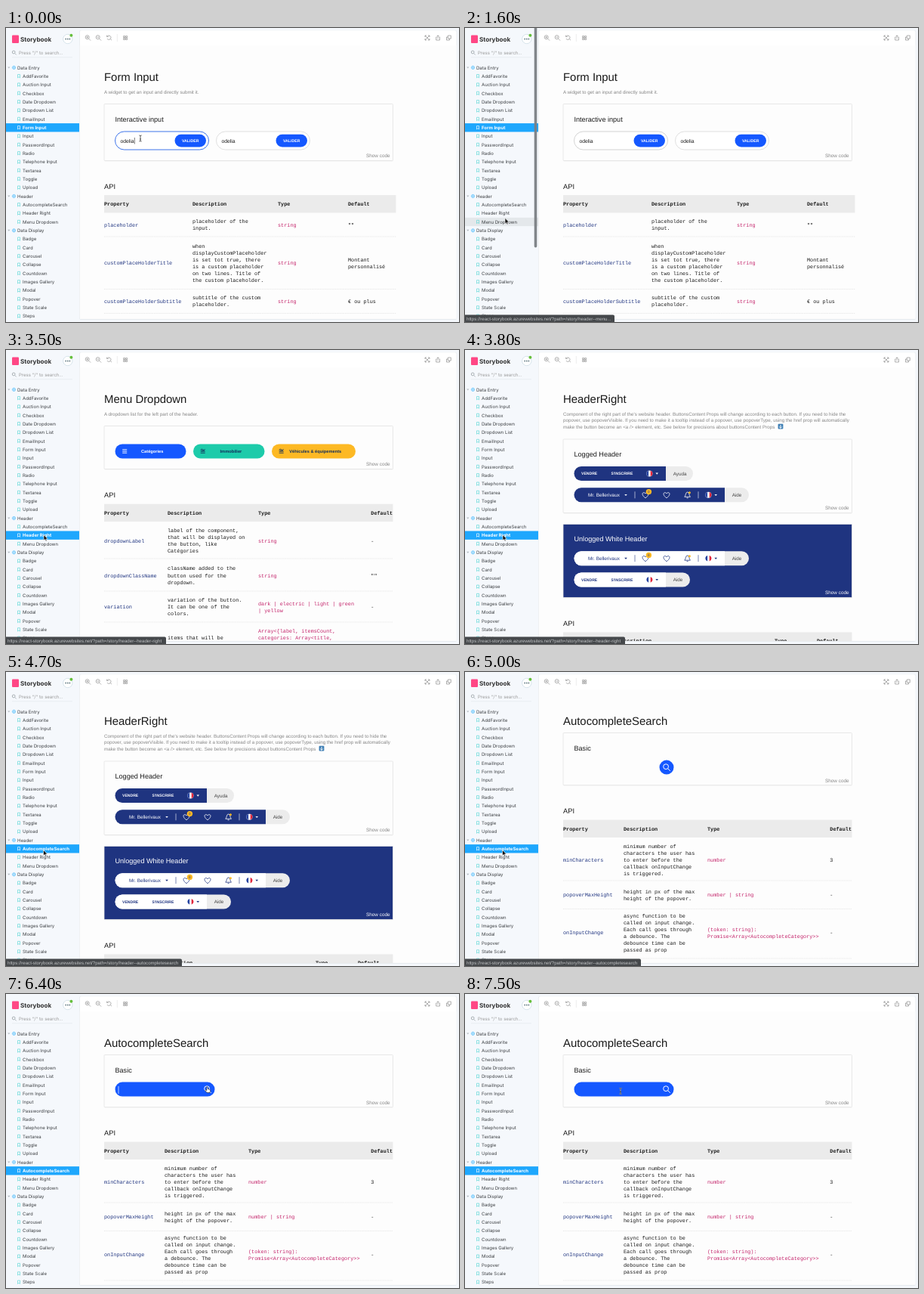
These frames come from a looping animation (600x389 px, 8 s). An HTML page:

```html
<!DOCTYPE html>
<html lang="en">
<head>
<meta charset="utf-8">
<title>Component library tour</title>
<style>
html, body { margin: 0; height: 100%; overflow: hidden; background: #f5f8fc; }
svg { display: block; width: 600px; height: 389px; font-family: "Liberation Sans", Arial, sans-serif; }
text { white-space: pre; text-rendering: geometricPrecision; }
.mono { font-family: "Liberation Mono", "Courier New", monospace; }
.side { font-family: Inter, Roboto, sans-serif; }
.row rect { fill: none; }
.row text { fill: #3c3f42; }
.row .mark { fill: none; stroke: #55d6d4; stroke-width: .65; }
.row.hover rect { fill: #e4e8eb; }
.row.on rect { fill: #1ea7fd; }
.row.on text { fill: #fff; font-weight: 700; }
.row.on .mark { stroke: #fff; }
</style>
</head>
<body>
<svg id="stage" viewBox="0 0 600 389"></svg>
<script>
const LOOP = 8000, ROW = 11.34, TOP = 52.4;
const BLUE = '#1558ff', NAVY = '#1f3480', INK = '#1a1a1a', GREY = '#868686', YELLOW = '#fdb924', PAPER = '#fdfdfd';

// ---- drawing helpers; text is placed by its vertical centre ----
const esc = s => s.replace(/&/g, '&amp;').replace(/</g, '&lt;');
const text = (x, y, s, size, fill = INK, more = '') =>
  `<text x="${x}" y="${(y + size * .35).toFixed(2)}" font-size="${size}" fill="${fill}" ${more}>${esc(s)}</text>`;
const bold = (x, y, s, size, fill) => text(x, y, s, size, fill, 'font-weight="700"');
const rect = (x, y, r, b, fill, rx = 0, more = '') =>
  `<rect x="${x}" y="${y}" width="${r - x}" height="${b - y}" rx="${rx}" fill="${fill}" ${more}/>`;
const line = (d, stroke, w = .8, more = '') =>
  `<path d="${d}" fill="none" stroke="${stroke}" stroke-width="${w}" ${more}/>`;
const dot = (x, y, r, fill, more = '') => `<circle cx="${x}" cy="${y}" r="${r}" fill="${fill}" ${more}/>`;
const at = (x, y, body) => `<g transform="translate(${x} ${y})">${body}</g>`;
const lens = (x, y, r, stroke, w = .8) =>
  at(x, y, dot(-.6, -.6, r, 'none', `stroke="${stroke}" stroke-width="${w}"`) +
    line(`M${r * .6} ${r * .6}L${r * 1.5} ${r * 1.5}`, stroke, w));

const card = (top, bottom, fill = PAPER, label = GREY) =>
  rect(130.6, top + .8, 512.6, bottom + .9, '#f0f0f0', 1) +
  rect(130, top, 512.5, bottom, fill, 1, 'stroke="#e4e4e4" stroke-width=".8"') +
  text(477, bottom - 6.4, 'Show code', 6.4, label);

const title = s => text(130, 64.5, s, 14.9);
const intro = lines => lines.map((s, i) => text(130, 85 + i * 8.2, s, 6.26, GREY)).join('');

// cols: x positions; rows: [centre, bottom, four cells]
function table(cols, y, right, rows) {
  const fills = [NAVY, INK, '#c4246b', INK];
  let out = rect(130, y - 11.6, right, y + 11.8, '#ebebeb');
  ['Property', 'Description', 'Type', 'Default'].forEach((s, i) => out += bold(cols[i], y, s, 6.83));
  for (const [mid, bottom, ...cells] of rows) {
    cells.forEach((cell, c) => {
      const parts = cell.split('\n');
      parts.forEach((s, i) => out += text(cols[c], mid + (i - (parts.length - 1) / 2) * 9.1, s, 6.83, fills[c]));
    });
    out += line(`M130 ${bottom}H${right}`, '#ddd', .7, 'stroke-dasharray="1.2 1"');
  }
  return text(130, y - 23.2, 'API', 9.3) + `<g class="mono">${out}</g>`;
}

// ---- pages ----
const field = (x, id) =>
  rect(x, 137, x + 124, 161, '#fff', 12, `id="${id}" stroke="#dcdcdc" stroke-width=".9"`) +
  text(x + 7, 149.3, 'odelia', 6.8) +
  rect(x + 79, 140.8, x + 120.5, 157.4, BLUE, 8.3) + bold(x + 88.5, 149, 'VALIDER', 5.2, '#fff');

const formPage = title('Form Input') + intro(['A widget to get an input and directly submit it.']) +
  card(100.5, 175.5) + text(144.5, 121, 'Interactive input', 9.1) +
  field(144.5, 'field') + field(278.5, 'copy') + line('M170.3 145V153.5', INK, .6, 'id="caret"') +
  table([130, 247, 360, 453], 232.7, 516.5, [
    [260.5, 276, 'placeholder', 'placeholder of the\ninput.', 'string', '""'],
    [311, 345.5, 'customPlaceHolderTitle', 'when\ndisplayCustomPlaceholder\nis set tot true, there\nis a custom placeholder\non two lines. Title of\nthe custom placeholder.', 'string', 'Montant\npersonnalisé'],
    [361.5, 377.5, 'customPlaceHolderSubtitle', 'subtitle of the custom\nplaceholder.', 'string', '€ ou plus']]);

const burger = 'M-3 -2.2H3M-3 0H3M-3 2.2H3';
const waves = 'M-3 -1.8Q-1.5 -3.6 0 -2.2T3 -2.6M-3 0H3M-3 2.2H3M-2 -.8H2';
const choice = (x, r, fill, ink, tx, s, icon) => rect(x, 124.5, r, 143.5, fill, 9.5) +
  at(x + 12.7, 134, line(icon, ink, .9)) + bold(tx, 134, s, 5.7, ink);

const menuPage = title('Menu Dropdown') + intro(['A dropdown list for the left part of the header.']) +
  card(100.5, 157.5) +
  choice(144.5, 238.5, BLUE, '#fff', 179, 'Catégories', burger) +
  choice(248, 342.5, '#1dcbaa', '#14305c', 283.5, 'Immobilier', waves) +
  choice(352, 463, YELLOW, '#14305c', 375.3, 'Véhicules & équipements', waves) +
  table([130, 214, 334, 483.3], 215.3, 512.5, [
    [252.2, 276, 'dropdownLabel', 'label of the component,\nthat will be displayed on\nthe button, like\nCatégories', 'string', '-'],
    [298.2, 319, 'dropdownClassName', 'className added to the\nbutton used for the\ndropdown.', 'string', '""'],
    [339.8, 360, 'variation', 'variation of the button.\nIt can be one of the\ncolors.', 'dark | electric | light | green\n| yellow', '-'],
    [390.2, 420, '', 'items that will be\n\n', 'Array<{label, itemsCount,\ncategories: Array<title,\n\n\n', '']]);

const arrowDown = (x, y, ink) => at(x, y, `<path d="M-1.8 -.9H1.8L0 1.2Z" fill="${ink}"/>`);
const flag = (x, y) => at(x, y, dot(0, 0, 4, '#fff') +
  '<path d="M-1.3 -3.8A4 4 0 0 0 -1.3 3.8Z" fill="#2443a0"/><path d="M1.3 -3.8A4 4 0 0 1 1.3 3.8Z" fill="#e1263b"/>');
const heart = 'M0 3.7C-7 -1 -3.2 -5.8 0 -2.2C3.2 -5.8 7 -1 0 3.7Z';
const bell = 'M-3.8 2.5C-2 1 -2.7 -3.6 0 -3.8C2.7 -3.6 2 1 3.8 2.5ZM-1 4H1';

const bar = (y, split, end, help, fill, ink) =>
  rect(144.5, y - 9.5, end, y + 9.5, '#ececec', 9.5) + text(split + 9.7, y, help, 6.3, '#444') +
  `<path d="M${split} ${y - 9.5}H154A9.5 9.5 0 0 0 154 ${y + 9.5}H${split}Z" fill="${fill}"/>` +
  flag(split - 21.6, y) + arrowDown(split - 11.8, y, ink);
const guest = (y, end, help, fill, ink) => bar(y, 266, end, help, fill, ink) +
  bold(154, y, 'VENDRE', 5.1, ink) + bold(193.5, y, "S'INSCRIRE", 5.1, ink);
const member = (y, fill, ink) => bar(y, 344, 376, 'Aide', fill, ink) +
  text(163, y, 'Mr. Bellerivaux', 6.4, ink) + arrowDown(213, y, ink) +
  line(`M225 ${y - 4.5}v9M309 ${y - 4.5}v9`, ink, .6) +
  at(239, y + .3, line(heart, ink)) + at(267, y + .3, line(heart, ink)) + at(294.6, y, line(bell, ink)) +
  dot(243.4, y - 4.2, 3.7, YELLOW) + text(242, y - 4.2, '0', 4.6, NAVY) + dot(297.4, y - 3, 1.5, YELLOW);

const headerPage = title('HeaderRight') + intro([
    "Component of the right part of the's website header. ButtonsContent Props will change according to each button. If you need to hide the",
    'popover, use popoverVisible. If you need to make it a tooltip instead of a popover, use popoverType, using the href prop will automatically',
    'make the button become an <a /> element, etc. See below for precisions about buttonsContent Props']) +
  rect(414.6, 97.8, 421.4, 104.6, '#3f7fb5', 1) + line('M418 99V103.4M416.2 101.6L418 103.4L419.8 101.6', '#fff', 1) +
  card(118, 215.5) + text(144.5, 138, 'Logged Header', 9.1) +
  guest(163.5, 302, 'Ayuda', NAVY, '#fff') + member(191.8, NAVY, '#fff') +
  card(230.5, 327.5, NAVY, '#fff') + text(144.5, 250.3, 'Unlogged White Header', 9.1, '#fff') +
  member(275.7, '#fff', NAVY) + guest(304, 298, 'Aide', '#fff', NAVY) +
  table([130, 202, 410, 466], 385, 512.5, []);

const searchPage = title('AutocompleteSearch') + card(80.5, 149.7) + text(144.5, 100.5, 'Basic', 9.1) +
  rect(257.5, 116.6, 276.5, 135.6, BLUE, 9.5, 'id="pill"') +
  line('M149 122V132', '#fff', .7, 'id="searchCaret"') + lens(266.7, 125.8, 3.4, '#fff', 1) +
  table([130, 210, 321, 483.3], 207.2, 512.5, [
    [248.7, 276, 'minCharacters', 'minimum number of\ncharacters the user has\nto enter before the\ncallback onInputChange\nis triggered.', 'number', '3'],
    [294.7, 313.5, 'popoverMaxHeight', 'height in px of the max\nheight of the popover.', 'number | string', '-'],
    [345, 379, 'onInputChange', 'async function to be\ncalled on input change.\nEach call goes through\na debounce. The\ndebounce time can be\npassed as prop', '(token: string):\nPromise<Array<AutocompleteCategory>>', '-']]);

// ---- sidebar ----
const groups = {
  'Data Entry': 'AddFavorite,Auction Input,Checkbox,Date Dropdown,Dropdown List,EmailInput,Form Input,Input,PasswordInput,Radio,Telephone Input,Textarea,Toggle,Upload',
  'Header': 'AutocompleteSearch,Header Right,Menu Dropdown',
  'Data Display': 'Badge,Card,Carousel,Collapse,Countdown,Images Gallery,Modal,Popover,State Scale,Steps'
};
let rows = '', count = 0;
const addRow = (x, label, icon) => {
  const y = TOP + ROW * count++;
  rows += `<g class="row">${rect(0, y - ROW / 2, 97.5, y + ROW / 2, '')}${at(0, y, icon)}${text(x, y, label, 6)}</g>`;
};
for (const [name, items] of Object.entries(groups)) {
  addRow(15, name, '<path d="M2.2 -1H5.4L3.8 1.2Z" fill="#b5bcc2"/>' +
    dot(10.5, 0, 2.1, 'none', 'stroke="#4cbcfd" stroke-width=".7"') + line('M8.5 0H12.5M10.5 -2V2', '#4cbcfd', .5));
  items.split(',').forEach(s => addRow(22, s, '<path class="mark" d="M15.5 -2.2H18.5V2.2L17 .9L15.5 2.2Z"/>'));
}
const sidebar = `<g class="side">${rows}` +
  rect(8, 9.5, 17, 20, '#ff4785', 1) + bold(19, 14.8, 'Storybook', 8.1, '#333') +
  dot(81.8, 14.5, 6.2, '#fff', 'stroke="#cddde6" stroke-width=".8"') +
  [79.2, 81.8, 84.4].map(x => dot(x, 14.5, .85, '#44606b')).join('') + dot(86.4, 9.8, 2, '#66bf3c') +
  lens(10.8, 32.6, 1.9, '#8a9299', .7) + text(17, 33, 'Press "/" to search...', 6, '#999') +
  line('M8 38.8H88', '#e3e8ec', .7) + '</g>';

const toolbar =
  [108.3, 122.3].map(x => lens(x, 12.8, 2.5, '#8f8f8f', .7)).join('') +
  line('M147.3 8V18', '#e6e6e6', .7) +
  line('M106.5 12.2H109M107.7 11V13.4M120.5 12.2H123M134 11.2A2.7 2.7 0 1 1 133.9 14M133.6 9.6V11.6H135.6M138.4 14.6L140 16.2M155.6 10.6h2v2h-2zM158.6 10.6h2v2h-2zM155.6 13.5h2v2h-2zM158.6 13.5h2v2h-2z' +
    'M555 12V10H557M559 10H561V12M561 14V16H559M557 16H555V14M555 10L561 16M561 10L555 16' +
    'M570.5 12H569.7V16H574.5V12H573.7M572.1 14V9.8M570.6 11.2L572.1 9.7L573.6 11.2' +
    'M585.3 10h4v4h-4zM585.3 12H583.5V16H587.5V14', '#8f8f8f', .7);

const beam = 'M-1.6 -4Q0 -4 0 -3V3Q0 4 -1.6 4M1.6 -4Q0 -4 0 -3M0 3Q0 4 1.6 4M-1 1H1';
const pointers = {
  beam: line(beam, '#fff', 1.5, 'stroke-opacity=".6"') + line(beam, '#333'),
  arrow: '<path d="M0 0V7.4L1.7 5.9L2.9 8.5L4.1 8L3 5.4H5.3Z" fill="#111" stroke="#fff" stroke-width=".6"/>',
  hand: '<path d="M-.6 -3.6Q.3 -4.2 .7 -3.4L1 -.8L3.6 -.2Q4.3 .1 4.2 1L3.6 4H-.3L-2.6 1.2Q-2.6 .3 -1.7 .5L-.6 1.2Z" fill="#fff" stroke="#222" stroke-width=".6"/>'
};

const stage = document.getElementById('stage');
stage.innerHTML =
  '<clipPath id="view"><rect x="98" y="23" width="498" height="362"/></clipPath>' +
  sidebar +
  rect(97, 3, 597.2, 386, '#e6eaee', 2) + rect(97.8, 3.3, 596.5, 385, '#fff', 2) + toolbar +
  rect(97.8, 23, 596.5, 385, PAPER) +
  [formPage, menuPage, headerPage, searchPage].map(p => `<g class="page" clip-path="url(#view)">${p}</g>`).join('') +
  rect(91.7, -3, 95.3, 290.5, '#7c8084', 1.8, 'id="scroll"') +
  `<g id="status">${rect(-3, 379.5, 198, 392, '#45484b', 2, 'id="plate"')}${text(2, 384.6, '', 6.1, '#c3c5c7', 'id="link"')}</g>` +
  '<g id="pointer">' + Object.entries(pointers).map(([k, s]) => `<g id="${k}">${s}</g>`).join('') + '</g>';

// ---- time ----
const $ = id => document.getElementById(id);
const pages = [...document.querySelectorAll('.page')], rowEls = [...document.querySelectorAll('.row')];
const show = (el, on) => el.style.display = on ? '' : 'none';
const span = (t, a, b) => Math.min(1, Math.max(0, (t - a) / (b - a)));
const ease = p => p * p * (3 - 2 * p);
// latest entry whose start time has passed
const pick = (t, list) => list.filter(e => e[0] <= t).pop()[1];

const path = [[0, 178, 146], [700, 178, 146], [1450, 53, 251.5], [2600, 53, 251.5], [3200, 50, 244.5],
  [4350, 50, 244.5], [4550, 49.5, 235.5], [5150, 49.5, 235.5], [5650, 267.5, 126.5], [6350, 267.5, 126.5], [7000, 206, 128.5], [LOOP, 206, 128.5]];
const base = 'https://react-storybook.azurewebsites.net/?path=/story/header--';
const links = [[0, ['menu...', 198]], [3000, ['header-right', 212]], [4500, ['autocompletesearch', 233]]];

function draw(t) {
  const i = path.findIndex(k => k[0] > t), [t0, x0, y0] = path[i - 1], [t1, x1, y1] = path[i];
  const p = ease(span(t, t0, t1)), x = x0 + (x1 - x0) * p, y = y0 + (y1 - y0) * p;
  $('pointer').setAttribute('transform', `translate(${x} ${y})`);
  const shape = pick(t, [[0, 'beam'], [850, 'arrow'], [5600, 'hand'], [6500, 'beam']]);
  for (const k in pointers) show($(k), k === shape);

  const page = pick(t, [[0, 0], [2100, 1], [3700, 2], [4900, 3]]);
  pages.forEach((el, n) => show(el, n === page));
  const chosen = pick(t, [[0, 7], [1700, 18], [3400, 17], [4600, 16]]);
  const hovered = x < 97 ? Math.round((y - TOP) / ROW) : -1;
  rowEls.forEach((el, n) => el.setAttribute('class', 'row' + (n === chosen ? ' on' : n === hovered ? ' hover' : '')));

  const focus = t < 1600;
  $('field').setAttribute('stroke', focus ? '#2a66e8' : '#cfcfcf');
  show($('caret'), focus && t % 1000 < 500);
  $('scroll').style.opacity = span(t, 1150, 1250) * (1 - span(t, 1800, 2000)) * .95;

  const [tail, edge] = pick(t, links);
  $('link').textContent = base + tail;
  $('plate').setAttribute('width', edge + 3);
  $('status').style.opacity = t < 1600 ? 0 : 1 - span(t, 5550, 5800);

  const left = 257.5 - 113 * ease(span(t, 6000, 6300));
  $('pill').setAttribute('x', left);
  $('pill').setAttribute('width', 276.5 - left);
  show($('searchCaret'), t >= 6300 && t % 1000 < 500);
}

const start = performance.now();
(function tick() {
  draw((performance.now() - start) % LOOP);
  requestAnimationFrame(tick);
})();
</script>
</body>
</html>
```
